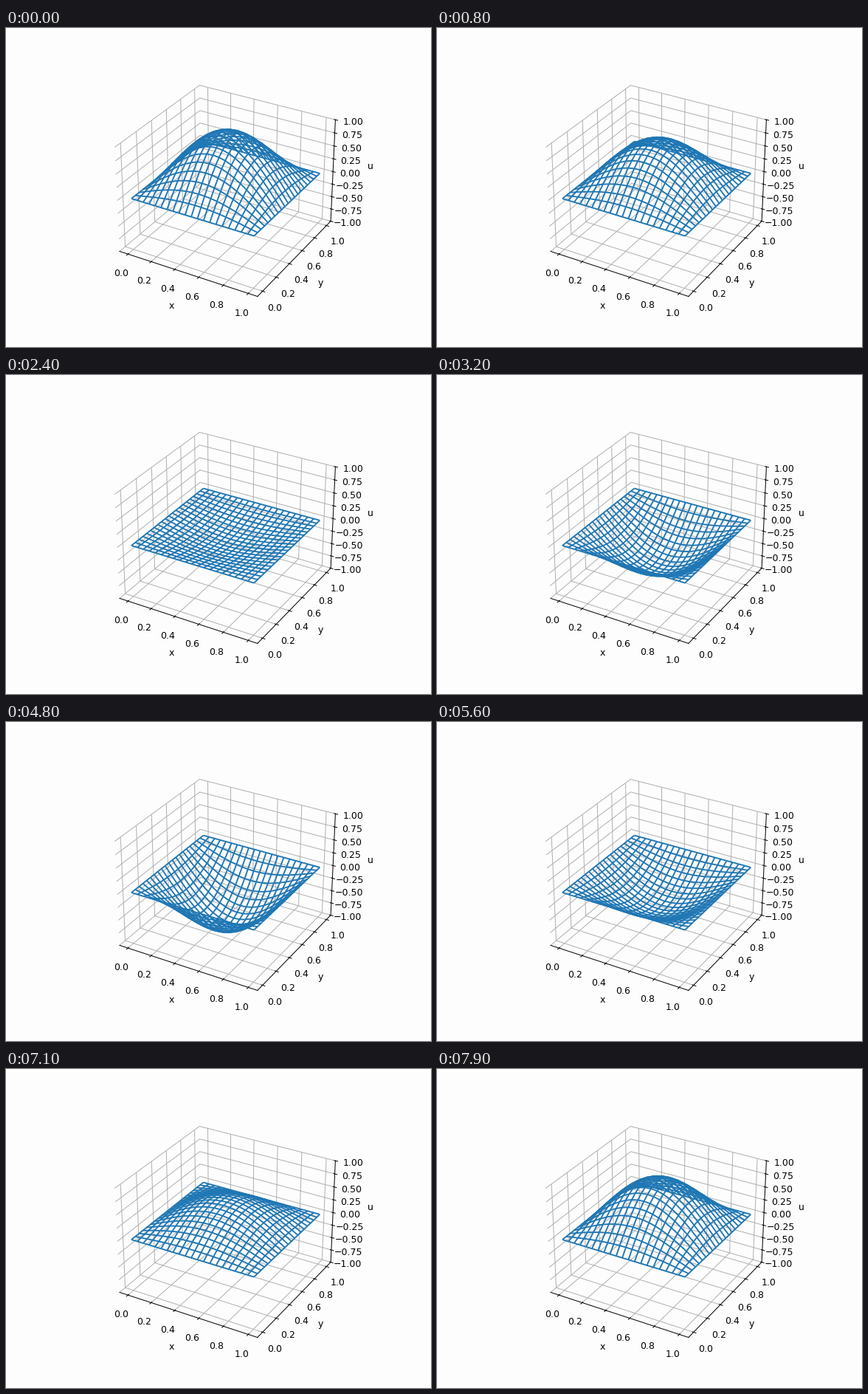
A matplotlib script for the animation above (8000 ms loop, 576 by 432 pixels).

```python
import numpy as np
import matplotlib.pyplot as plt
from matplotlib.animation import FuncAnimation

FRAMES, INTERVAL = 80, 100      # ms per frame
DT = 0.0165                     # simulated time per frame
OMEGA = np.sqrt(2) * np.pi      # lowest mode of the unit square, c = 1
CELLS = 20
MARGIN = 1 / 48
PAPER = "#fdfdfd"

grid = np.linspace(0, 1, CELLS + 1)
X, Y = np.meshgrid(grid, grid)
MODE = np.sin(np.pi * X) * np.sin(np.pi * Y)

fig = plt.figure(figsize=(6.4, 4.8), dpi=90, facecolor=PAPER)
ax = fig.add_subplot(projection="3d", facecolor=PAPER)


def membrane(frame):
    return np.cos(OMEGA * DT * frame) * MODE


def mesh_lines(Z):
    points = np.stack([X, Y, Z], axis=-1)
    return [*points, *points.swapaxes(0, 1)]


wire = ax.plot_wireframe(X, Y, membrane(0), rcount=CELLS + 1, ccount=CELLS + 1)

ax.set_xlabel("x")
ax.set_ylabel("y")
ax.set_zlabel("u")
ax.set_xticks(np.linspace(0, 1, 6))
ax.set_yticks(np.linspace(0, 1, 6))
ax.set_zticks(np.linspace(-1, 1, 9))
ax.set_xlim(-0.05, 1.05, view_margin=MARGIN)
ax.set_ylim(-0.05, 1.05, view_margin=MARGIN)
ax.set_zlim(-1, 1)
for axis in (ax.xaxis, ax.yaxis, ax.zaxis):
    axis.set_pane_color(PAPER)


def update(frame):
    wire.set_segments(mesh_lines(membrane(frame)))
    return [wire]


anim = FuncAnimation(fig, update, frames=FRAMES, interval=INTERVAL,
                     repeat=True, repeat_delay=0)
plt.show()
```
